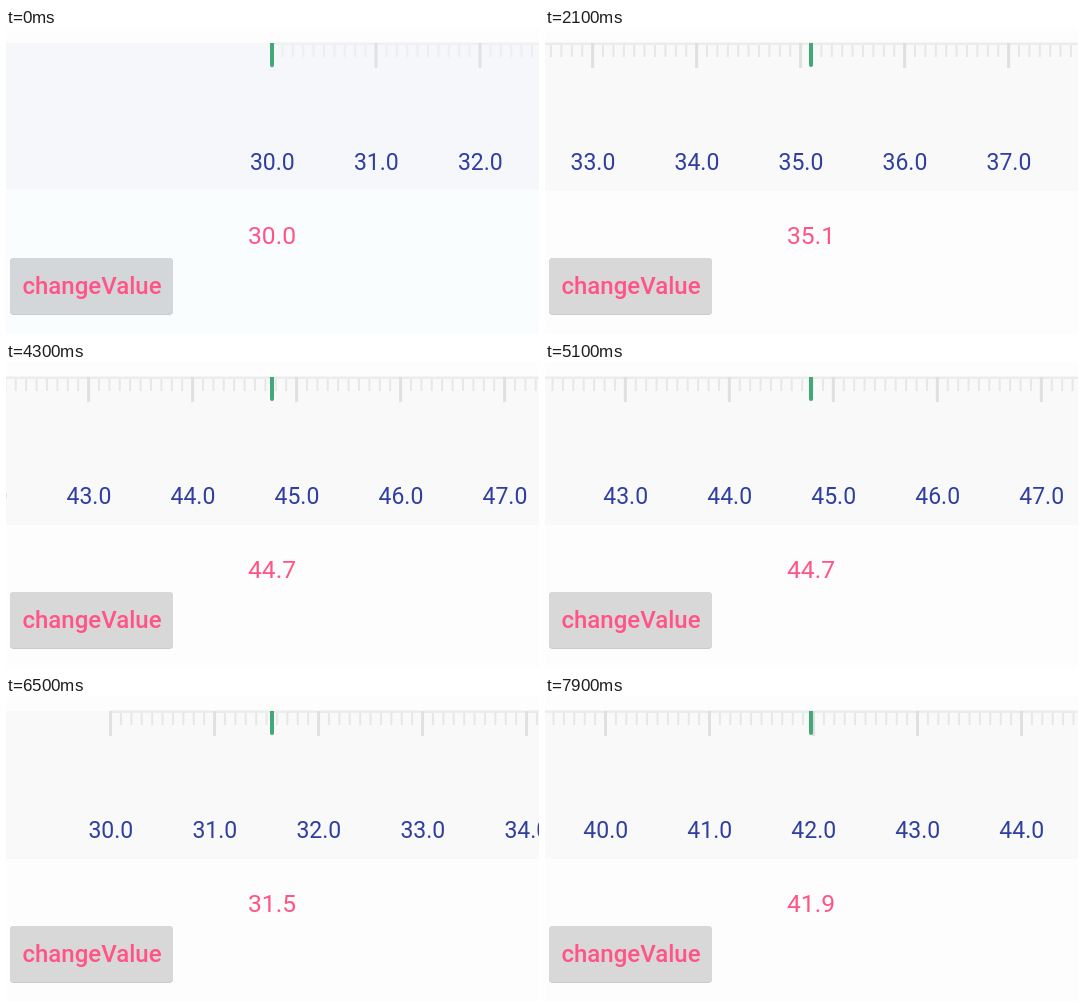
These frames come from a looping animation (533 by 306 pixels, 8 s). An HTML page with a canvas:

```html
<!DOCTYPE html>
<html lang="en">
<head>
<meta charset="utf-8">
<title>Ruler value</title>
<style>
  html, body { margin: 0; width: 100%; height: 100%; overflow: hidden; background: #fdfdfd; }
  canvas { display: block; width: 533px; height: 306px; }
</style>
</head>
<body>
<canvas id="stage" width="533" height="306"></canvas>
<script>
const W = 533, H = 306, LOOP = 8000, STEP = 100;
const MID = 266, UNIT = 104, MIN = 30;
const ctx = document.getElementById("stage").getContext("2d");

// Button presses: eased scroll between two values, settled at `end`.
const presses = [
  { start: 1200, show: 1300, end: 2100, from: 30, to: 35.1 },
  { start: 2688, show: 2700, end: 3500, from: 35.1, to: 40.1 },
  { start: 3896, show: 4000, end: 4900, from: 40.1, to: 45.1 },
  { start: 6388, show: 6500, end: 7300, from: 30, to: 35.1 }
];
// Finger flings: one value per step.
const flings = [
  { show: 5100, path: [44.785, 42.2, 37.6, 33, 30] },
  { show: 7500, path: [35.4, 37, 39.1, 40.8, 41.976] }
];
const moves = [...presses, ...flings].sort((a, b) => a.show - b.show);

const themes = {
  cool: { page: "#fafdfe", band: "#f5f7fa", bottom: 161.5, minor: "#eceef0", major: "#dfe1e5", line: "#eff1f3", button: "#d4d7da" },
  plain: { page: "#fdfdfd", band: "#f8f9f8", bottom: 163, minor: "#e6e7e6", major: "#e0e0e0", line: "#ebecec", button: "#d8d8d8" }
};

// Viscous-fluid scroll easing.
function viscous(p) {
  const x = p * 8, knee = Math.exp(-1);
  return x < 1 ? x - 1 + Math.exp(-x) : knee + (1 - Math.exp(1 - x)) * (1 - knee);
}

function valueAt(t) {
  let value = MIN;
  for (const m of moves) {
    if (t < m.show) break;
    if (m.path) {
      value = m.path[Math.min(Math.floor((t - m.show) / STEP), m.path.length - 1)];
    } else {
      const p = t >= m.end ? 1 : viscous((t - m.start) / 1000) / viscous(1);
      value = m.from + (m.to - m.from) * p;
    }
  }
  return value;
}

function box(x, y, w, h, color, radius = 0) {
  ctx.fillStyle = color;
  ctx.beginPath();
  ctx.roundRect(x, y, w, h, radius);
  ctx.fill();
}

function label(text, x, y, size, color, weight = 400) {
  ctx.font = `${weight} ${size}px Roboto, sans-serif`;
  ctx.fillStyle = color;
  ctx.textAlign = "center";
  ctx.fillText(text, x, y);
}

function drawRuler(value, theme) {
  const xOf = v => MID + (v - value) * UNIT;
  const left = Math.max(0, xOf(MIN));
  box(left, 14.5, W - left, 2.5, theme.line);
  const first = Math.max(MIN * 10, Math.floor((value - 3) * 10));
  for (let i = first; i <= (value + 3) * 10; i++) {
    const x = xOf(i / 10);
    if (i % 10) {
      box(x - 1, 17, 2, 12, theme.minor);
    } else {
      box(x - 1.5, 15, 3, 25, theme.major);
      label((i / 10).toFixed(1), x + 0.3, 141.5, 23, "#303f9f");
    }
  }
  box(MID - 2, 15, 4, 24, "#43a877", [0, 0, 2, 2]);
}

function draw(t) {
  const theme = t < 1300 ? themes.cool : themes.plain;
  const value = valueAt(t);
  box(0, 0, W, H, theme.page);
  box(0, 0, W, 15, "#fdfdfd");
  box(0, 15, W, theme.bottom - 15, theme.band);
  drawRuler(value, theme);
  const shown = Math.floor(value * 10 + 0.01) / 10;
  label(shown.toFixed(1), MID, 215.5, 24.6, "#ff5485");
  box(4, 230, 163, 57, "#c9cacb", 4);
  box(4, 230, 163, 56, theme.button, 4);
  label("changeValue", 86, 266, 24, "#ff5485", 500);
}

const origin = performance.now();
function frame() {
  const t = Math.max(0, performance.now() - origin) % LOOP;
  draw(Math.floor(t / STEP) * STEP);
  requestAnimationFrame(frame);
}
frame();
</script>
</body>
</html>
```
